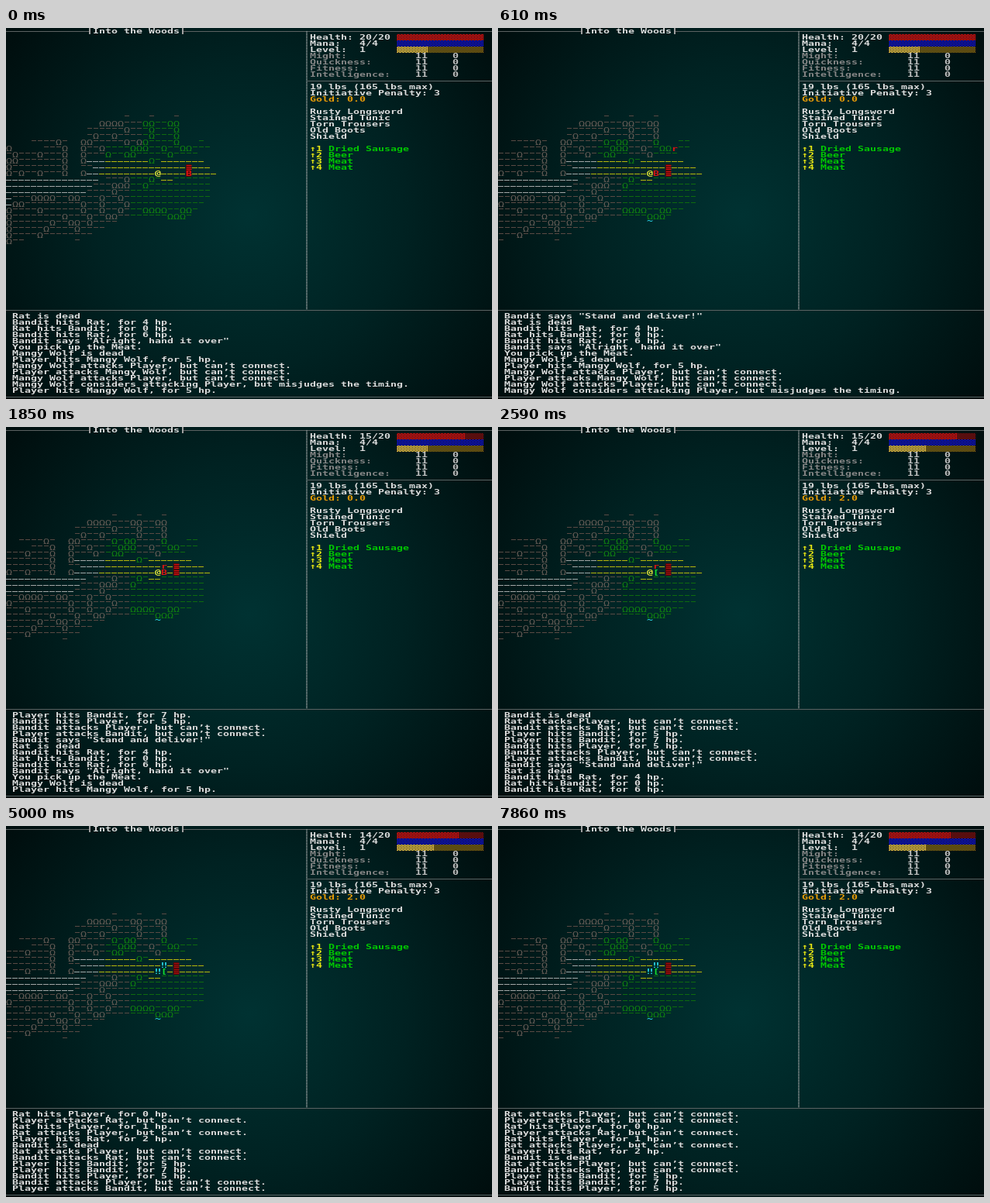
An HTML page with a canvas that plays this animation: 627x479 px, repeating every 8 s.

```html
<!DOCTYPE html>
<html lang="en">
<head>
<meta charset="utf-8">
<title>Into the Woods</title>
<style>
html, body { margin: 0; width: 100%; height: 100%; overflow: hidden; background: #001010; }
canvas { display: block; }
</style>
</head>
<body>
<canvas id="stage" width="627" height="479"></canvas>
<script>
const W = 627, H = 479, CELL = 8, LOOP = 8000;
const ctx = document.getElementById('stage').getContext('2d');

const WHITE = '#dcdcdc', GRAY = '#868686', LINE = '#5c6262';
const RED = '#d81414', YELLOW = '#e6e614', GREEN = '#00c800';
const CYAN = '#28d8e8', ORANGE = '#e89c08';
const DIM = { '.': '#5a4a44', T: '#665c56', '-': '#a2a6a6' };
const LIT = { '.': '#0e6a0e', T: '#108010', '-': '#b6b60c' };

const MAP_TOP = 14;
const MAP = [
  '                   .   .   .',
  '               TTTT...TT..TT',
  '             ......T...T...T',
  '             .T..T.....T...T',
  '    ....T.  TT.....T.TT....T   ..',
  'T     ...T  T..T....TTT..T..TT...',
  '.T...T...T  T...T..TT.....T....',
  'TT.......T  T----------T.-------',
  'T........T  ..--------------------',
  'T.T..T...T  T----------------------',
  '--------------- ...T...T.--.......',
  '--------------...TTT..T...........',
  '-------------....T................',
  '-...TTTT..TT...T..T...............',
  '-TT.........T..T...T..............',
  'T....T......T..T..T...TTTT..TT..',
  'T........T...T..TT........TTT.',
  'T......T..TT.T....',
  'T.....T....T....',
  'T....T........',
  'T..        .'
];

const miss = (a, b) => `${a} attacks ${b}, but can’t connect.`;
const hit = (a, b, n) => `${a} hits ${b}, for ${n} hp.`;
const P = 'Player', B = 'Bandit', R = 'Rat', M = 'Mangy Wolf';

// Newest message first
const LOG = [
  miss(R, P), miss(P, R), hit(R, P, 0), miss(P, R), hit(R, P, 1), miss(R, P),
  hit(P, R, 2), 'Bandit is dead', miss(R, P), miss(B, R), hit(P, B, 5),
  hit(P, B, 7), hit(B, P, 5), miss(B, P), miss(P, B),
  'Bandit says "Stand and deliver!"', 'Rat is dead', hit(B, R, 4), hit(R, B, 0),
  hit(B, R, 6), 'Bandit says "Alright, hand it over"', 'You pick up the Meat.',
  'Mangy Wolf is dead', hit(P, M, 5), miss(M, P), miss(P, M), miss(M, P),
  'Mangy Wolf considers attacking Player, but misjudges the timing.', hit(P, M, 5)
];

// Each turn overrides part of the state before it
const TURNS = [
  { at: 0, log: 16, shift: 0, hp: 20, bandit: 29, rat: null, loot: false, flash: false },
  { at: 70, log: 15, shift: 1, bandit: 27 },
  { at: 610, shift: 2, bandit: 25, rat: [28, 19] },
  { at: 1220, log: 12, hp: 15, rat: [26, 21] },
  { at: 1850, log: 11, rat: [25, 22] },
  { at: 2450, log: 7, bandit: 0, loot: true, flash: true },
  { at: 2590, flash: false },
  { at: 3990, log: 4, hp: 14 },
  { at: 5000, log: 2, flash: true },
  { at: 5060, flash: false },
  { at: 7860, log: 0, flash: true }
];

const stateAt = t => Object.assign({}, ...TURNS.filter(s => s.at <= t));

const FONT = 'bold 9.5px "DejaVu Sans Mono", monospace';
const THIN = '9.5px "DejaVu Sans Mono", monospace';
ctx.font = FONT;
const aspect = CELL / ctx.measureText('M').width; // square character cells

function rect(x, y, w, h, color) {
  ctx.fillStyle = color;
  ctx.fillRect(x, y, w, h);
}

function print(str, col, row, color = WHITE, font = FONT) {
  ctx.save();
  ctx.translate(col * CELL, row * CELL + 7);
  ctx.scale(aspect, 1);
  ctx.font = font;
  ctx.fillStyle = color;
  ctx.fillText(str, 0, 0);
  ctx.restore();
}

function shade(col, row, cells, color, dense) {
  ctx.fillStyle = color;
  const x0 = col * CELL, y0 = row * CELL;
  for (let y = 0; y < CELL; y++) {
    for (let x = 0; x < cells * CELL; x++) {
      const on = dense ? (x + 2 * (y % 2)) % 4 !== 0 : (x + y) % 2 === 0;
      if (on) ctx.fillRect(x0 + x, y0 + y, 1, 1);
    }
  }
}

function bar(row, filled, bright, dark) {
  shade(63, row, filled, bright, true);
  shade(63 + filled, row, 14 - filled, dark, false);
}

function drawBackground() {
  const g = ctx.createRadialGradient(314, 242, 0, 314, 242, 395);
  g.addColorStop(0, '#003232');
  g.addColorStop(0.5, '#002222');
  g.addColorStop(1, '#000d0d');
  ctx.fillStyle = g;
  ctx.fillRect(0, 0, W, H);
}

function drawFrame() {
  rect(0, 4, 108, 1, LINE);
  rect(228, 4, W - 228, 1, LINE);
  rect(388, 68, W - 388, 1, LINE);
  rect(0, 364, W, 1, LINE);
  rect(0, 476, W, 1, LINE);
  rect(107, 0, 2, 8, '#a0a0a0');
  rect(227, 0, 2, 8, '#a0a0a0');
  for (let y = 4; y < 364; y += 2) rect(387, y, 2, 1, '#9a9e9e');
  print('Into the Woods', 14, 0);
}

function drawStats(s) {
  print('Health: ' + s.hp + '/20', 49, 1);
  print('Mana:   4/4', 49, 2);
  print('Level:  1', 49, 3);
  bar(1, Math.round(s.hp / 20 * 14), '#c81010', '#b00c0c');
  bar(2, 14, '#1010b4', '#080870');
  bar(3, s.loot ? 6 : 5, '#dcb440', '#b88410');
  ['Might:', 'Quickness:', 'Fitness:', 'Intelligence:'].forEach((name, i) => {
    print(name, 49, 4 + i, GRAY);
    print('11', 66, 4 + i, '#c0c0c0');
    print('0', 72, 4 + i, '#c0c0c0');
  });
  print('19 lbs (165 lbs max)', 49, 9);
  print('Initiative Penalty: 3', 49, 10);
  print('Gold: ' + (s.loot ? '2.0' : '0.0'), 49, 11, ORANGE);
  ['Rusty Longsword', 'Stained Tunic', 'Torn Trousers', 'Old Boots', 'Shield']
    .forEach((item, i) => print(item, 49, 13 + i));
  ['Dried Sausage', 'Beer', 'Meat', 'Meat'].forEach((item, i) => {
    print('↑' + (i + 1), 49, 19 + i, YELLOW);
    print(item, 52, 19 + i, GREEN);
  });
}

// Trees north of the road hide part of the view
function isLit(col, row, shift) {
  const dx = col - 24, dy = row - 23;
  if (dx * dx + dy * dy > 81) return false;
  if (row >= 24) return col >= 20;
  if (row >= 21) return true;
  if (shift === 0) return row >= 19 || col >= 22;
  return row >= 18 && (col < 21 || col > 24);
}

function drawTile(kind, col, row, lit) {
  const x = col * CELL, y = row * CELL, color = (lit ? LIT : DIM)[kind];
  if (kind === 'T') print('Ω', col, row, color, THIN);
  else if (kind === '-') rect(x, y + 4, 7, 1, color);
  else rect(x + 1, y + 1, 6, 1, color);
}

function drawMap(s) {
  const blood = 29 - s.shift;
  const taken = (c, r) =>
    (c === 24 && r === 23) || (c === s.bandit && r === 23) ||
    (c === blood && (r === 22 || r === 23)) ||
    (s.loot && c === 25 && r === 23) ||
    (s.rat && c === s.rat[0] && r === s.rat[1]);
  MAP.forEach((line, i) => {
    const row = MAP_TOP + i;
    [...line].forEach((kind, n) => {
      const col = n - s.shift;
      if (kind === ' ' || col < 0 || taken(col, row)) return;
      const lit = isLit(col, row, s.shift);
      if (lit || col < 30) drawTile(kind, col, row, lit);
    });
  });

  const stain = s.loot ? '#a81010' : RED;
  for (const row of [22, 23]) {
    rect(blood * CELL, row * CELL, 7, 8, '#500808');
    if (s.bandit !== blood || row === 22) print('≡', blood, row, stain);
  }
  if (s.bandit) print('B', s.bandit, 23, RED);
  if (s.loot) print('[', 25, 23, '#10e030');
  if (s.shift === 2) print('~', 24, 30.6, CYAN);
  if (s.flash) {
    print('‼', 24, 23, CYAN);
    print('‼', 25, 22, CYAN);
  } else {
    print('@', 24, 23, '#f4f43c');
    if (s.rat) print('r', ...s.rat, RED);
  }
}

function drawLog(s) {
  LOG.slice(s.log, s.log + 13).forEach((msg, i) => print(msg, 1, 46 + i));
}

let shown = -1;
function tick(now) {
  const s = stateAt(now % LOOP);
  if (s.at !== shown) {
    shown = s.at;
    drawBackground();
    drawFrame();
    drawStats(s);
    drawMap(s);
    drawLog(s);
  }
  requestAnimationFrame(tick);
}
requestAnimationFrame(tick);
</script>
</body>
</html>
```
